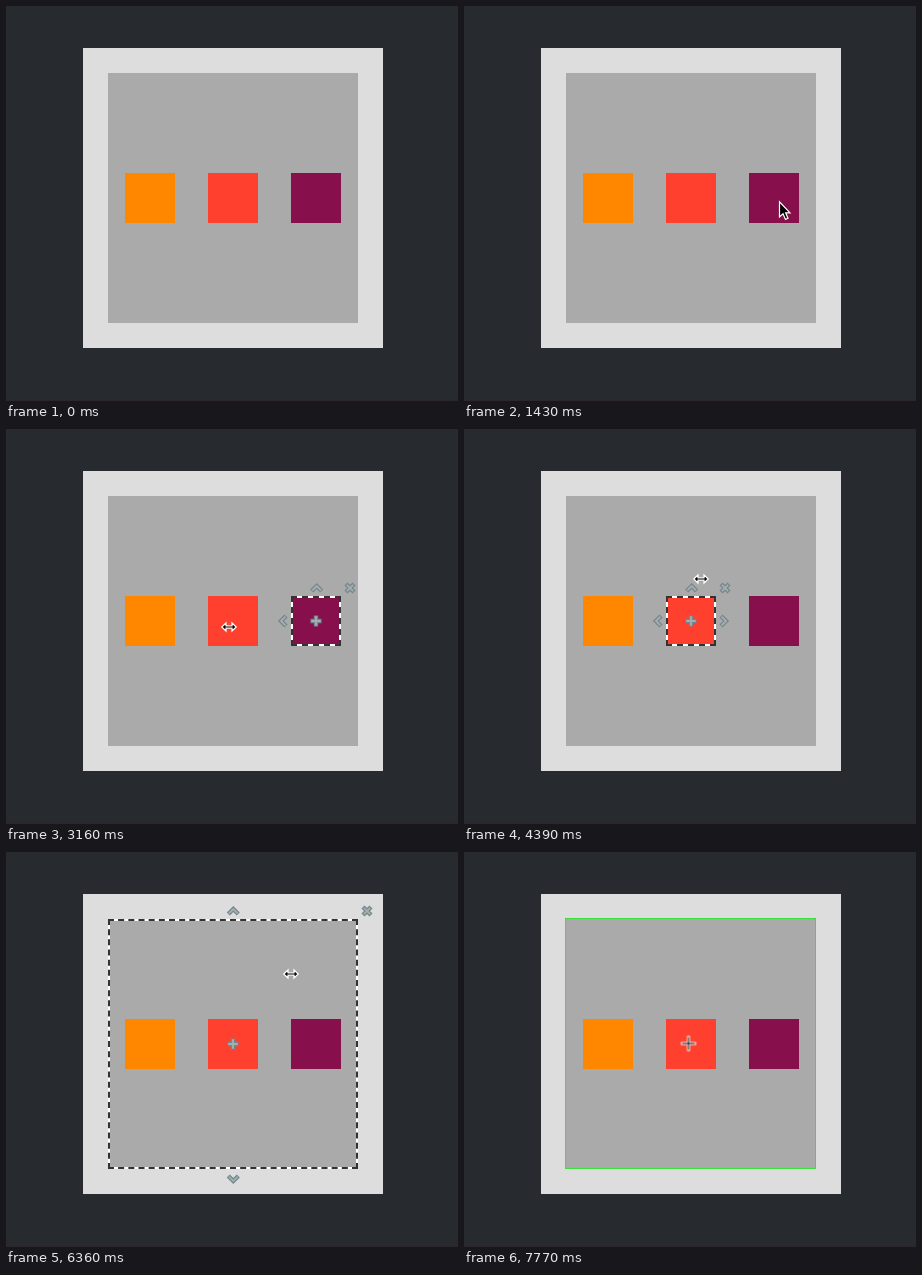
Write an HTML page that moves like this. It is 452 by 395 pixels and loops after 8 s.

```html
<!DOCTYPE html>
<html lang="en">
<head>
<meta charset="utf-8">
<title>Selecting nested boxes</title>
<style>
html, body { margin: 0; width: 100%; height: 100%; overflow: hidden; background: #272a2e; }
svg { display: block; width: 452px; height: 395px; }

.edge { fill: none; stroke: #fff; stroke-width: 2; }
.dash { fill: none; stroke: #333; stroke-width: 2; }
.hover { fill: none; stroke: #3be03b; stroke-width: 1; }
.rim { fill: none; stroke: #77868a; stroke-width: 4.4; }
.core { fill: none; stroke: #a3b0b3; stroke-width: 1.8; }
.ink { fill: #000; stroke: #fff; stroke-width: 1.2; }

.timed { opacity: 0; animation: 8s step-end infinite; }
#pick-child { animation-name: pick-child; }
#pick-middle { animation-name: pick-middle; }
#pick-parent { animation-name: pick-parent; }
#hover-child { animation-name: hover-child; }
#hover-parent { animation-name: hover-parent; }
#arrow { animation-name: arrow; }
#cross { animation-name: cross; }
#resize { animation-name: resize; }
#cursor { animation: travel 8s step-end infinite; }

@keyframes pick-child { 0%, 48.25% { opacity: 0 } 33.5% { opacity: 1 } }
@keyframes pick-middle { 0%, 64.5% { opacity: 0 } 48.25% { opacity: 1 } }
@keyframes pick-parent { 0%, 96.375% { opacity: 0 } 64.5% { opacity: 1 } }
@keyframes hover-child { 0%, 33.5% { opacity: 0 } 32.75% { opacity: 1 } }
@keyframes hover-parent { 0% { opacity: 0 } 97.125%, 100% { opacity: 1 } }
@keyframes arrow { 0% { opacity: 1 } 26.125%, 100% { opacity: 0 } }
@keyframes cross { 0%, 33.5% { opacity: 0 } 26.125%, 96.375%, 100% { opacity: 1 } }
@keyframes resize { 0%, 96.375% { opacity: 0 } 33.5% { opacity: 1 } }

/* Pointer path: holds by default, stepped while the hand moves. */
@keyframes travel {
  0% { transform: translate(329px, 397px) }
  6.25% { transform: translate(329px, 397px); animation-timing-function: steps(5, start) }
  9.9375% { transform: translate(327px, 300px); animation-timing-function: steps(5, start) }
  13.625% { transform: translate(318px, 228px) }
  15.75% { transform: translate(318px, 228px); animation-timing-function: steps(4, start) }
  18.5875% { transform: translate(314px, 195px) }
  26.125% { transform: translate(316px, 203px) }
  32.75% { transform: translate(311px, 198px) }
  37.25% { transform: translate(311px, 198px); animation-timing-function: steps(4, start) }
  40.125% { transform: translate(223px, 198px); animation-timing-function: steps(3, start) }
  43.3125% { transform: translate(210px, 198px) }
  45.25% { transform: translate(211px, 197px) }
  53.5% { transform: translate(211px, 197px); animation-timing-function: steps(3, start) }
  55.5% { transform: translate(237px, 150px); animation-timing-function: steps(6, start) }
  59.9625% { transform: translate(286px, 116px) }
  79.5% { transform: translate(285px, 122px) }
  80.25% { transform: translate(285px, 122px); animation-timing-function: steps(2, start) }
  81.75% { transform: translate(276px, 190px); animation-timing-function: steps(2, start) }
  83.25% { transform: translate(258px, 265px); animation-timing-function: steps(2, start) }
  84.75% { transform: translate(228px, 305px); animation-timing-function: steps(2, start) }
  86.25% { transform: translate(212px, 280px); animation-timing-function: steps(2, start) }
  87.625% { transform: translate(214px, 240px); animation-timing-function: steps(3, start) }
  89.625% { transform: translate(225px, 192px) }
  96.375%, 100% { transform: translate(224.5px, 191.5px) }
}
</style>
</head>
<body>
<svg viewBox="0 0 452 395">
  <defs>
    <g id="chevron">
      <path class="rim" d="M-5 3L0 -2L5 3"/>
      <path class="core" d="M-4.4 2.4L0 -2L4.4 2.4"/>
    </g>
    <g id="close">
      <path class="rim" d="M-4 -4L4 4M4 -4L-4 4"/>
      <path class="core" d="M-3.2 -3.2L3.2 3.2M3.2 -3.2L-3.2 3.2"/>
    </g>
    <g id="plus">
      <path class="rim" d="M-5.5 0H5.5M0 -5.5V5.5"/>
      <path class="core" stroke-width="2" d="M-4.7 0H4.7M0 -4.7V4.7"/>
    </g>
    <!-- Frame and handles of a 50px box, centred on 0,0 -->
    <g id="small-pick">
      <rect class="edge" x="-24" y="-24" width="48" height="48"/>
      <path class="dash" stroke-dasharray="6 5" d="M-25 -24H25M-25 24H25M-24 -25V25M24 -25V25"/>
      <use href="#chevron" x="0.7" y="-33"/>
      <use href="#chevron" transform="translate(-33 0) rotate(-90)"/>
      <use href="#close" x="34" y="-33"/>
      <use href="#plus"/>
    </g>
  </defs>

  <rect width="452" height="395" fill="#272a2e"/>
  <rect y="393" width="452" height="2" fill="#2d272b"/>
  <rect x="77" y="42" width="300" height="300" fill="#ddd"/>
  <rect x="102" y="67" width="250" height="250" fill="#aaa"/>
  <rect x="119" y="167" width="50" height="50" fill="#ff8700"/>
  <rect x="202" y="167" width="50" height="50" fill="#ff402e"/>
  <rect x="285" y="167" width="50" height="50" fill="#870f4b"/>

  <rect id="hover-child" class="timed hover" x="284.5" y="166.5" width="50" height="50"/>
  <rect id="hover-parent" class="timed hover" x="101.5" y="66.5" width="250" height="250"/>

  <g id="pick-child" class="timed"><use href="#small-pick" x="310" y="192"/></g>
  <g id="pick-middle" class="timed">
    <use href="#small-pick" x="227" y="192"/>
    <use href="#chevron" transform="translate(260 192) rotate(90)"/>
  </g>
  <g id="pick-parent" class="timed">
    <rect class="edge" x="103" y="68" width="248" height="248"/>
    <path class="dash" stroke-dasharray="6 4.1667" d="M102 68H352M102 316H352M103 67V317M351 67V317"/>
    <use href="#chevron" x="227.3" y="59"/>
    <use href="#chevron" transform="translate(227.3 327) rotate(180)"/>
    <use href="#close" x="361" y="59"/>
    <use href="#plus" x="227" y="192"/>
  </g>

  <g id="cursor">
    <path id="arrow" class="timed ink" d="M1.5 .8V16L5 12.8L7.5 18.4L10 17.3L7.6 11.8H12Z"/>
    <g id="cross" class="timed">
      <path fill="none" stroke="#fff" stroke-width="3" d="M-7.5 0H7.5M0 -7.5V7.5"/>
      <path fill="none" stroke="#000" d="M-6.5 0H6.5M0 -6.5V6.5"/>
    </g>
    <path id="resize" class="timed ink" d="M-7.2 0L-3 -4V-1.2H3V-4L7.2 0L3 4V1.2H-3V4Z"/>
  </g>
</svg>
</body>
</html>
```
